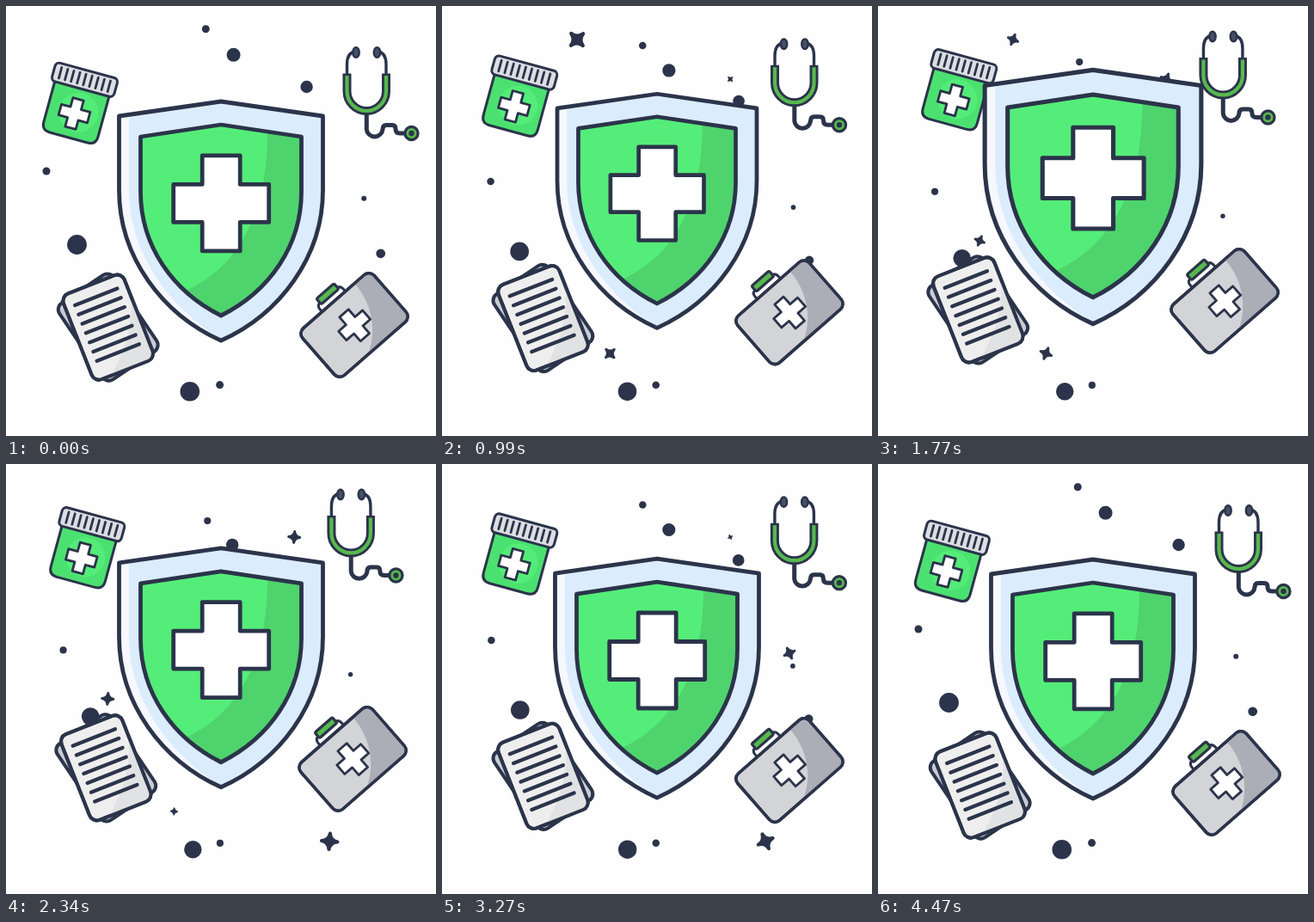
Recreate the animation shown at these times as an HTML page. Size 500 px wide and 500 px high, loop 4.53 s.

```html
<!DOCTYPE html>
<html lang="en">
<head>
<meta charset="utf-8">
<style>
  html, body { margin: 0; height: 100%; overflow: hidden; background: #fefefe; }
  svg { display: block; width: 100vw; height: 100vh; }
  .line { stroke: #2b344a; stroke-linejoin: round; stroke-linecap: round; }
  .none { fill: none; }
  .ink { fill: #2b344a; }
  .bare { stroke: none; }
</style>
</head>
<body>
<svg viewBox="0 0 500 500">
  <defs>
    <path id="outer" d="M250 111L368.5 128V214C368.5 292 318 358.5 250 389C182 358.5 131.5 292 131.5 214V128Z"/>
    <path id="inner" d="M250 138L343.5 152V216C343.5 279 306 332 250 360C194 332 156.5 279 156.5 216V152Z"/>
    <rect id="case" x="-55.3" y="-36.3" width="110.6" height="72.6" rx="8.3"/>
    <rect id="sheet" x="-38" y="-53.5" width="76" height="107" rx="9"/>
    <clipPath id="outerClip"><use href="#outer"/></clipPath>
    <clipPath id="innerClip"><use href="#inner"/></clipPath>
    <clipPath id="caseClip"><use href="#case"/></clipPath>
    <clipPath id="sheetClip"><use href="#sheet"/></clipPath>
  </defs>

  <g id="dots" class="ink"></g>
  <g id="stars" class="ink line" stroke-width=".36"></g>

  <g id="bottle">
    <g class="line" stroke-width="3" transform="translate(91.3 86.5) rotate(15.3)">
      <path fill="#4be170" d="M-32 8H32.5V59Q32.5 69 22.5 69H-23Q-33 69 -33 59V8Z"/>
      <circle class="bare" cx="3" cy="38" r="23" fill="#54ec78"/>
      <path id="bottleCross" fill="#fff" stroke-width="2.8"/>
      <rect x="-37.5" y="-12" width="75" height="22.5" rx="5" fill="#dcdee3"/>
      <path id="ridges" class="none" stroke-width="2.8"/>
    </g>
  </g>

  <g id="stethoscope" class="line none">
    <path stroke-width="3.4" d="M396.5 80V68Q396.5 54 406 53M442 80V68Q442 54 432.5 53"/>
    <path stroke-width="5" d="M419.3 126V143.5A9.4 9.4 0 0 0 438 143.5Q438 138.500 442 138.500H449Q453 138.500 453 143Q453 148 458 148H464"/>
    <path stroke-width="10" stroke-linecap="butt" d="M396.5 78.5V99A22.75 23 0 0 0 442 99V78.5"/>
    <path style="stroke:#58b84f" stroke-width="4.2" stroke-linecap="butt" d="M396.5 81V99A22.75 23 0 0 0 442 99V81"/>
    <g fill="#465066" stroke-width="2.5">
      <ellipse cx="407" cy="54" rx="3.7" ry="5.7"/>
      <ellipse cx="431.5" cy="54" rx="3.7" ry="5.7"/>
    </g>
    <circle cx="471.5" cy="148" r="7.6" fill="#58b84f" stroke-width="3.2"/>
    <circle class="ink" cx="471.5" cy="148" r="2.2" stroke-width="2"/>
  </g>

  <g id="papers">
    <g class="line" stroke-width="4" transform="translate(118.7 373.6)">
      <use href="#sheet" transform="rotate(-34)" fill="#c8ccd3"/>
      <g transform="rotate(-21.5)">
        <use href="#sheet" fill="#eeeeee"/>
        <path class="bare" clip-path="url(#sheetClip)" fill="#e1e2e3" d="M40 -35C32 8 5 35 -20 56H40Z"/>
        <use href="#sheet" class="none"/>
        <path id="writing" class="none" stroke-width="4.3"/>
      </g>
    </g>
  </g>

  <g id="kit">
    <g class="line" stroke-width="3.5" transform="translate(405 371) rotate(-41.2)">
      <path class="none" stroke-width="3" d="M-18 -36V-40Q-18 -46 -12 -46H12Q18 -46 18 -40V-36"/>
      <rect x="-13" y="-52" width="27" height="8.5" rx="2" fill="#58b84f" stroke-width="3.2"/>
      <use href="#case" fill="#d3d4d7"/>
      <path class="bare" clip-path="url(#caseClip)" fill="#abaeb6" d="M32 -38C33 0 10 27 -14 38H60V-38Z"/>
      <use href="#case" class="none"/>
      <path id="kitCross" fill="#fff" stroke-width="2.8"/>
    </g>
  </g>

  <g id="shield">
    <use href="#outer" fill="#f5f8fc"/>
    <path clip-path="url(#outerClip)" fill="#dbecfd" d="M143 100V214C143 290 194 357 258 392H400V100Z"/>
    <use href="#outer" class="line none" stroke-width="4.8"/>
    <use href="#inner" fill="#55ed79"/>
    <path clip-path="url(#innerClip)" fill="#4fd36d" d="M304 135C306 240 272 304 205 333L250 365H350V135Z"/>
    <use href="#inner" class="line none" stroke-width="4.8"/>
    <path id="shieldCross" class="line" fill="#fff" stroke-width="4.8"/>
  </g>
</svg>
<script>
const $ = id => document.getElementById(id);
const clamp = v => Math.min(1, Math.max(0, v));
const ease = v => { v = clamp(v); return v * v * (3 - 2 * v); };
const ramp = (t, from, to) => ease((t - from) / (to - from));
const mix = (a, b, p) => a + (b - a) * p;

function add(parent, tag, attrs = {}) {
  const el = document.createElementNS('http://www.w3.org/2000/svg', tag);
  for (const key in attrs) el.setAttribute(key, attrs[key]);
  return parent.appendChild(el);
}

// Plus sign: half length h, half arm width a
function plus(id, x, y, h, a) {
  const d = h - a;
  $(id).setAttribute('d', `M${x - a} ${y - h}h${2 * a}v${d}h${d}v${2 * a}h${-d}v${d}h${-2 * a}v${-d}h${-d}v${-2 * a}h${d}z`);
}
plus('bottleCross', -1.2, 40.3, 17.3, 6.4);
plus('kitCross', 0, 0.3, 18.5, 6.9);
plus('shieldCross', 250.2, 229.4, 55.5, 22);

const repeat = (n, fn) => Array.from({ length: n }, (_, i) => fn(i)).join('');
$('ridges').setAttribute('d', repeat(9, i => `M${-29.5 + i * 7.35} -7.5v13`));
$('writing').setAttribute('d', repeat(7, i => `M-26.5 ${-38 + i * 11.6}h53`));

// x, y, radius, shift x, shift y
const dots = [
  [232.3, 26.7, 4.5, 2, 40.3], [264.6, 56.8, 8, -1.5, 38], [349.6, 94, 7.2, -9.5, 34.5],
  [47, 192, 4.5, 20, 25], [82.5, 277.5, 11.4, 16, 16.5], [416.2, 223.8, 3, -16, 21.5],
  [213.8, 448.2, 11.3, 3.6, 0], [248.6, 440.6, 4.5, .3, .3], [435.7, 287.8, 5.4, -18, 16.5]
].map(spec => ({ spec, el: add($('dots'), 'circle') }));

// x, y, size, appear start/end, vanish start/end
const stars = [
  [157, 39, 12, 10, 25, 50, 72], [335.2, 85, 8, 22, 44, 98, 118], [118.3, 273, 8, 40, 64, 85, 107],
  [195.4, 404, 8.2, 10, 25, 68, 90], [376.2, 438.8, 11.3, 62, 76, 120, 142], [404, 220, 8, 80, 94, 120, 142]
].map(spec => ({
  spec,
  el: add($('stars'), 'path', { d: 'M0 -.82Q.1 -.1 .82 0Q.1 .1 0 .82Q-.1 .1 -.82 0Q-.1 -.1 0 -.82Z' })
}));

const floaters = { bottle: [8.5, -16], stethoscope: [-18.5, -19], papers: [-2.5, -20.7], kit: [-2, -28.7] };
const LOOP = 4530, TICK = 30;

function draw(t) {
  const fall = ramp(t, 71, 149);
  const itemShift = ramp(t, 0, 65) - fall;
  const dotShift = ramp(t, 0, 68) - fall;

  for (const id in floaters) {
    const [dx, dy] = floaters[id];
    $(id).setAttribute('transform', `translate(${dx * itemShift} ${dy * itemShift})`);
  }
  for (const { spec: [x, y, r, dx, dy], el } of dots) {
    el.setAttribute('cx', x + dx * dotShift);
    el.setAttribute('cy', y + dy * dotShift);
    el.setAttribute('r', r * (1 - .1 * dotShift));
  }
  for (const { spec: [x, y, size, a, b, c, d], el } of stars) {
    const s = size * (ramp(t, a, b) - ramp(t, c, d));
    el.setAttribute('visibility', s > .05 ? 'visible' : 'hidden');
    el.setAttribute('transform', `translate(${x} ${y}) rotate(${77 - .93 * t}) scale(${s})`);
  }

  const lift = t < 62 ? ease((t / 62) ** 1.3) : 1 - ease(Math.sqrt((t - 62) / 59));
  const scale = t < 40 ? mix(1, .977, ramp(t, 0, 40))
    : t < 59 ? mix(.977, 1.062, ramp(t, 40, 59))
    : mix(1.062, 1, ramp(t, 59, 78));
  $('shield').setAttribute('transform', `translate(250 ${250 - 28.3 * lift}) scale(${scale}) translate(-250 -250)`);
}

const start = performance.now();
function tick() {
  draw((performance.now() - start) % LOOP / TICK);
  requestAnimationFrame(tick);
}
tick();
</script>
</body>
</html>
```
